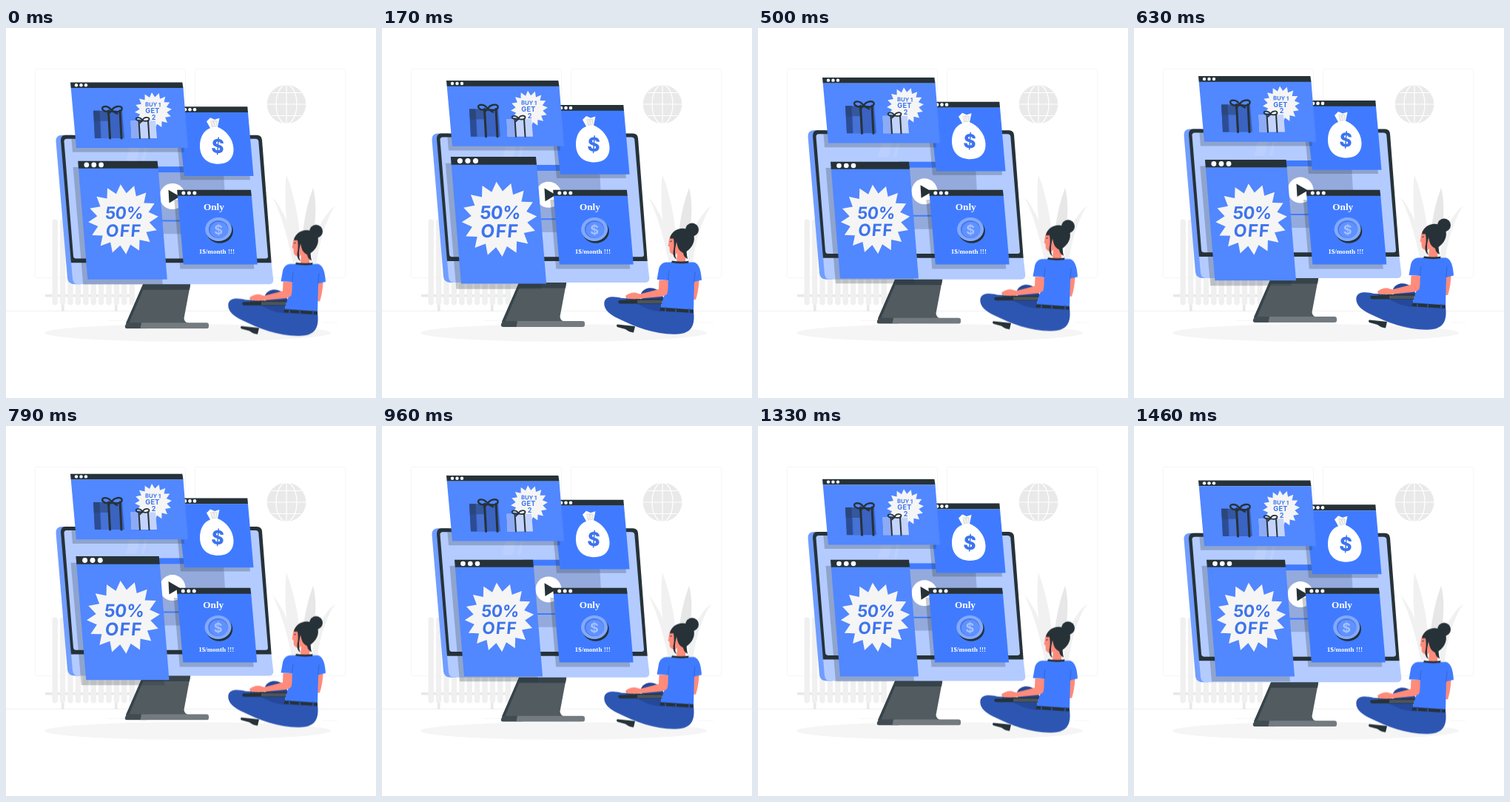
These frames come from a looping animation (500 px wide and 500 px high, 1.5 s). An HTML page:

```html
<!DOCTYPE html>
<html lang="en">
<head>
<meta charset="utf-8">
<title>Online offers</title>
<style>
html, body { margin: 0; height: 100%; overflow: hidden; background: #fff; }
svg { display: block; width: 100%; height: 100%; }
.float, .pulse, .shake { animation: float 1.5s linear -20ms infinite; }
.pulse { animation-name: pulse; transform-origin: 158px 260px; }
.shake { animation-name: shake; }
@keyframes float {
  0%, 100% { transform: translateY(.6px); }
  50% { transform: translateY(-9.4px); }
}
@keyframes pulse {
  0%, 30%, 40%, 60%, 100% { transform: scale(1); }
  10%, 50% { transform: scale(1.1); }
}
@keyframes shake {
  0%, 100% { transform: translateX(0); }
  10%, 90% { transform: translateX(-1px); }
  20%, 80% { transform: translateX(2px); }
  30%, 50%, 70% { transform: translateX(-4px); }
  40%, 60% { transform: translateX(4px); }
}
.ink { fill: #263238; }
.blue { fill: #407bff; }
.soft { fill: #5187ff; }
.pale { fill: #b3cbff; }
.skin { fill: #ff8b7b; }
.paper { fill: #f5f5f5; }
.white { fill: #fff; }
.shade { fill: #263238; fill-opacity: .25; }
.line { fill: none; stroke: #263238; stroke-linecap: round; }
text { text-anchor: middle; }
.sans { font-family: Inter, sans-serif; font-weight: 700; fill: #3d74ee; }
.serif { font-family: "Liberation Serif", serif; font-weight: 700; fill: #fff; }
</style>
</head>
<body>
<svg viewBox="0 0 500 500">
  <defs>
    <clipPath id="screenArea"><path d="M70 145H350V200H70Z"/></clipPath>
  </defs>

  <g fill="none" stroke="#f6f6f6">
    <rect x="39.5" y="55.5" width="203" height="282" rx="2"/>
    <rect x="255.5" y="55.5" width="203" height="282" rx="2"/>
    <path stroke="#f0f0f0" d="M0 382.5H500"/>
    <path d="M137 395.5H165M428 398H448"/>
  </g>

  <circle cx="379" cy="103" r="26.3" fill="#e9e9e9"/>
  <g fill="none" stroke="#fff" stroke-width="1.2">
    <path d="M379 76V130M352 103H406M358.5 87.5H399.5M358.5 118.5H399.5"/>
    <ellipse cx="379" cy="103" rx="14" ry="26.3"/>
  </g>

  <g id="radiator" fill="#f0f0f0">
    <path fill="#e8e8e8" d="M53 360H174V363.5H53ZM75 372H78.5V383H75ZM147 372H150.5V383H147Z"/>
  </g>

  <g fill="#f1f1f1">
    <path d="M379 198C389 225 398 262 399 312L392 318C381 285 374 240 379 198Z"/>
    <path d="M360 228C374 245 388 272 394 314L388 318C382 290 374 256 360 228Z"/>
    <path d="M445 240C425 256 414 284 413 318H420C423 288 432 260 445 240Z"/>
    <path fill="#e7e7e7" d="M415 216C422 240 417 280 408 318H398C399 280 404 245 415 216Z"/>
  </g>

  <ellipse class="paper" cx="245.5" cy="412" rx="193.5" ry="11.8"/>

  <g class="float">
    <path fill="#515b60" d="M186 344H249.5L240.5 392Q241 398 248 399H162Z"/>
    <path fill="#37434a" d="M186 344H249.5L248 353.5H185ZM186 344L188 347L166 399H162Z"/>
    <path fill="#414c52" d="M163 398H190V406H164Q160 406 161 402Z"/>
    <path fill="#737b80" d="M183 398H271Q274 398 274 401V403Q274 406 271 406H181.5Z"/>

    <path fill="#709dff" d="M75 144.5H90L100 346H93Q84 346 83 338L67.5 153Q67 145 75 144.5Z"/>
    <path class="pale" d="M88 316H358.5L361.3 340Q361.5 346 355 346H97Q91 346 90 339Z"/>
    <path class="ink" d="M80 144.5H339Q345.5 144.5 346 151L358.7 317H88L74 152Q74 144.5 80 144.5Z"/>
    <path class="pale" d="M82 149.5H337Q341 149.5 341.3 153L354 308Q354 311.3 351 311.3H94.5Q91.5 311.3 91 308L78.5 153Q78.5 149.5 82 149.5Z"/>
    <path fill="#bbd0ff" d="M170 150H184L176 181H162ZM190 150H194L187 181H183Z"/>

    <path fill="#94aadc" d="M190 195H294L299 278H190Z"/>
    <path class="blue" d="M190 187H293.5L294 195H190ZM190 259.2H298V261.2H190Z"/>
    <circle class="white" cx="225" cy="227.2" r="17.5"/>
    <path class="ink" d="M219.5 218.5L235 227.5L220.5 236.2Z"/>

    <path class="shade" d="M228 119H321L330 205H236Z"/>
    <path class="ink" d="M230 106H326.3L327 114H230Z"/>
    <path class="blue" d="M231 113.8H327L334.5 199.8H241Z"/>
    <g class="white">
      <circle cx="242" cy="110" r="2.3"/><circle cx="248.5" cy="110" r="2.3"/><circle cx="255" cy="110" r="2.3"/>
      <path d="M276 135C267 138 262 148 262 159C262 175 272 183.5 287 183.5C301 183.5 308 175 307.5 163C307 149 297 138 286 133.5L288.5 121.5L282 123.5L276 121L271 126Z"/>
    </g>
    <path fill="#e3e3e3" d="M276 125L282 124L286 125L285 133L278 134Z"/>
    <path fill="none" stroke="#fff" d="M278 126L281 132M283 126V132"/>
    <text class="sans" font-size="26" transform="translate(285.5 168.5) rotate(4)" style="font-weight:800">$</text>

    <path class="shade" clip-path="url(#screenArea)" d="M83 86H235L241 167.5H90Z"/>
    <path class="ink" d="M87 73H238.3L239.5 81H87.7Z"/>
    <path class="soft" d="M87.7 80.8H239.5L246 161.8H95Z"/>
    <g class="white"><circle cx="95" cy="77" r="2.2"/><circle cx="101.5" cy="77" r="2.2"/><circle cx="108" cy="77" r="2.2"/></g>
    <path class="paper" data-burst="199 111.5 25 18.5 16"/>
    <g class="sans">
      <text transform="translate(198.5 105.8) rotate(2)" font-size="7.6">BUY 1</text>
      <text x="198" y="114.8" font-size="9.2" letter-spacing=".3">GET</text>
      <text x="199.5" y="123.5" font-size="9">2</text>
    </g>

    <path fill="#3a63c2" d="M118 111.5H157L160 148.700H120Z"/>
    <path fill="#2c4c94" d="M118 111.5H126.5L128 148.700H120Z"/>
    <path fill="#263238" fill-opacity=".25" d="M118 111.5H138L139 125.5H119Z"/>
    <path fill="#4672d6" d="M128 125.500H138L139.500 148.700H129Z"/>
    <path class="line" stroke-width="3" stroke-linecap="butt" d="M138.5 111.5L140.500 148.700M154 111.5L156 148.700"/>
    <path class="line" stroke-width="2.4" d="M143 111.5C132 115.500 127 107.500 132 106C138 104.500 141 108.500 143 111.500C145 105.500 154 104 156.500 107.500C158 112.500 150 114.500 143 111.500L138 115.500M143 111.500L150 115.500"/>
    <path fill="#c3d3fb" d="M168.5 125H202L204 148.700H169.500Z"/>
    <path fill="#8dabf5" d="M168.5 125H179L181 148.700H169.500Z"/>
    <path class="line" stroke-width="2" stroke-linecap="butt" d="M179.5 125L181 148.700M192 125L193.5 148.700"/>
    <path class="line" stroke-width="1.8" d="M184.5 124.5C177 127 173.5 122 177 121C181 120 183 122 184.5 124.5C186 120 192 119.5 193.5 122C194 126 188 126 184.5 124.5L181 128"/>
  </g>

  <g class="pulse">
    <path class="shade" d="M91.5 189H198L211 345.3H105Z"/>
    <path class="ink" d="M98 180.8H204L205 191H98.8Z"/>
    <path class="soft" d="M98.8 190.8H205L217 338.6H111Z"/>
    <g class="white"><circle cx="109.5" cy="186" r="3.3"/><circle cx="119.3" cy="186" r="3.3"/><circle cx="129" cy="186" r="3.3"/></g>
    <path class="paper" data-burst="158.5 258.5 46.8 35 16"/>
    <g class="sans" font-size="22.5">
      <text transform="translate(159 258) skewX(-5)" letter-spacing="-.5">50%</text>
      <text transform="translate(158.5 281.3) skewX(-5)" letter-spacing="1.3">OFF</text>
    </g>
  </g>

  <g class="shake">
    <path class="shade" d="M227.5 232H327L335.5 325.5H235.5Z"/>
    <path class="ink" d="M231.3 218.8H331L332 227H232Z"/>
    <path class="blue" d="M232 226.8H332L340 319.5H240Z"/>
    <g class="white"><circle cx="240" cy="223" r="2.5"/><circle cx="247.5" cy="223" r="2.5"/><circle cx="255" cy="223" r="2.5"/></g>
    <text class="serif" x="281" y="246" font-size="13.2">Only</text>
    <ellipse class="ink" cx="289" cy="274.5" rx="18" ry="16.2"/>
    <ellipse cx="287.3" cy="272" rx="18" ry="16" fill="#82a9ff"/>
    <ellipse cx="287.3" cy="272" rx="13.3" ry="12" fill="#4678e6"/>
    <ellipse cx="288" cy="272.7" rx="12.3" ry="11" fill="#5f91ff"/>
    <text class="sans" x="287.3" y="278.8" font-size="18" style="fill:#a3c0ff">$</text>
    <text class="serif" x="285" y="305" font-size="9.1">1$/month !!!</text>
  </g>

  <g class="float">
    <path fill="#26489a" d="M350 361C354 352 366 351 374 357L384 371L352 372Z"/>
    <path class="ink" d="M318 402.5L342 405L340 413.500Q334 413 329 409L318 406Q316 404 318 402.5Z"/>
    <path fill="#2d56b3" d="M300.500 372C302 364 314 364 324 367L378 369L376 380L421 384C423 402 420 414 400 415.600C374 417.500 344 407 318 394C306 388 299 381 300.500 372Z"/>
    <path fill="#26489a" d="M344 374H378L376 385C364 384 354 380 344 374Z"/>
    <path class="skin" d="M420 340L428.5 342C428 354 426 363 424 369H418Z"/>
    <path class="blue" d="M385 318.500C380 318 375 322 374 328L371.5 342L386.5 343L385 352L376 381L421 384L422 345L432 342.500C431 330 429 321 422 318.500Z"/>
    <path fill="none" stroke="#3267d8" d="M388 330L386.5 343M423 331L421.8 345"/>
    <path class="ink" d="M376.3 379.5L421 382.5L420.5 387L375.5 384.3Z"/>
    <path fill="none" stroke="#2d56b3" stroke-width="1.5" d="M383 379V386M397 380V387M415 381V388"/>
    <path class="ink" d="M320 370L378.5 367.5V374.5H322Q318 374 320 370Z"/>
    <path fill="#4b555a" d="M345 369.5H378V374H345Z"/>
    <path fill="none" stroke="#263238" stroke-dasharray="3 1" d="M330 368.5H378"/>
    <path class="skin" d="M374.5 342.5L386.5 343Q387 355 385.5 361Q383 364 376 365L350 367.5Q338 369 330 367L329 364Q335 359 342 359.5L349 361.5L374 355Z"/>
    <path class="skin" d="M396 297L411 298L410 318Q404 321 398 318L399 307Z"/>
    <path class="ink" d="M392 316.5Q404 318.5 414.5 316.8L414 319.5Q402 321 391 319Z"/>
    <path class="skin" d="M390 282C387 288 388 292 386.5 296.5L388.5 298L388.8 304Q391 309 397 308L405 300L402 282Z"/>
    <circle class="ink" cx="419" cy="274.5" r="9"/>
    <path class="ink" d="M389 286.5C391 276 402 271 411 273.500L421 281C424 290 419 299 411.500 304Q412 310 413 314Q408 312 407 306Q401 303 399.500 297L398 291Q395.500 301 396 306Q396 311 398 314.500Q393 312 393.500 304Q395.500 296 394 286.500Z"/>
    <path class="line" stroke-width=".9" d="M389.5 290.5L391.5 290"/>
  </g>
</svg>
<script>
const fix = n => n.toFixed(2);

for (const el of document.querySelectorAll('[data-burst]')) {
  const [cx, cy, outer, inner, spikes] = el.dataset.burst.split(' ').map(Number);
  const pts = Array.from({ length: spikes * 2 }, (_, i) => {
    const a = Math.PI * (i / spikes - 0.525), r = i % 2 ? inner : outer;
    return fix(cx + r * Math.cos(a)) + ' ' + fix(cy + r * Math.sin(a));
  });
  el.setAttribute('d', 'M' + pts.join('L') + 'Z');
}

const radiator = document.getElementById('radiator');
for (let i = 0; i < 11; i++) {
  const bar = document.createElementNS('http://www.w3.org/2000/svg', 'rect');
  const attrs = { x: 62.5 + i * 10.4, y: 258.5, width: 7.4, height: 116, rx: 3.7 };
  for (const k in attrs) bar.setAttribute(k, attrs[k]);
  radiator.append(bar);
}
</script>
</body>
</html>
```
